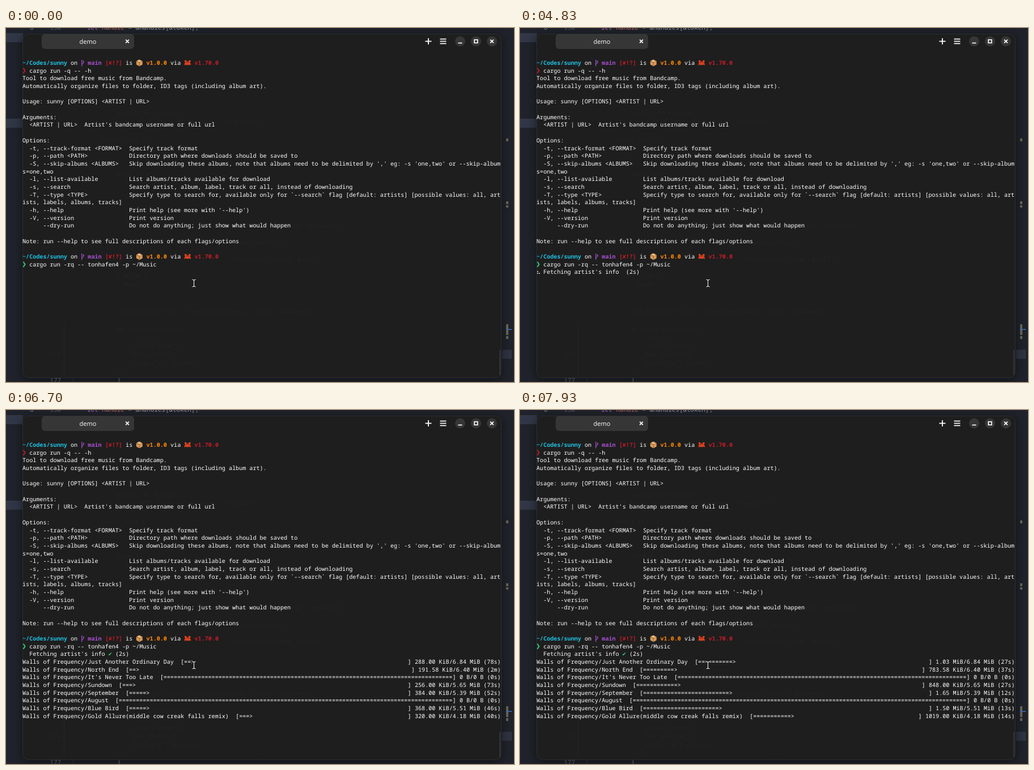
An HTML page with a canvas for the animation above (8000 ms loop, 896 by 625 pixels).

```html
<!DOCTYPE html>
<html lang="en">
<head>
<meta charset="utf-8">
<title>Terminal demo</title>
<style>
html, body { margin: 0; width: 100%; height: 100%; overflow: hidden; background: #20232b; }
canvas { display: block; width: 896px; height: 625px; }
</style>
</head>
<body>
<canvas id="stage" width="896" height="625"></canvas>
<script>
const ctx = document.getElementById('stage').getContext('2d');
const LOOP = 8000;
const COLS = 139, CELL = 6.07, ROW = 13.68, LEFT = 29, TOP = 54.6, ASCENT = 10.45;
const MONO = '10.117px "Noto Sans Mono", "DejaVu Sans Mono", monospace';
const CODE = '10.95px "Noto Sans Mono", "DejaVu Sans Mono", monospace';
const FG = '#ffffff', RED = '#c01c28', GREEN = '#33d17a', CYAN = '#1fbfe0';
const PURPLE = '#a84fd0', ORANGE = '#ff8700';

const HELP = `Tool to download free music from Bandcamp.
Automatically organize files to folder, ID3 tags (including album art).

Usage: sunny [OPTIONS] <ARTIST | URL>

Arguments:
  <ARTIST | URL>  Artist's bandcamp username or full url

Options:
  -t, --track-format <FORMAT>  Specify track format
  -p, --path <PATH>            Directory path where downloads should be saved to
  -S, --skip-albums <ALBUMS>   Skip downloading these albums, note that albums need to be delimited by ',' eg: -s 'one,two' or --skip-album
s=one,two
  -l, --list-available         List albums/tracks available for download
  -s, --search                 Search artist, album, label, track or all, instead of downloading
  -T, --type <TYPE>            Specify type to search for, available only for \`--search\` flag [default: artists] [possible values: all, art
ists, labels, albums, tracks]
  -h, --help                   Print help (see more with '--help')
  -V, --version                Print version
      --dry-run                Do not do anything; just show what would happen

Note: run --help to see full descriptions of each flags/options`.split('\n');
const COMMAND = 'cargo run -rq -- tonhafen4 -p ~/Music';

const ENTER = 3000, FETCH = 3130, DONE = 5500;
const BLINKS = [[100, 730], [1330, 1900], [2500, ENTER]];
const SPINNER = '⠁⠁⠉⠙⠚⠒⠂⠂⠒⠲⠴⠤⠄⠄⠤⠠⠠⠤⠦⠖⠒⠐⠐⠒⠓⠋⠉⠈⠈';

// Download progress: KiB done and seconds left at each key time
const KEYS = [6270, 6700, 7500, 7930];
const STEPS = [8, 15, 8];
const track = (title, mib, done, eta) => ({ title, mib, done, eta });
const TRACKS = [
  track('Just Another Ordinary Day', 6.84, [32, 288, 624, 1056], [240, 78, 37, 27]),
  track('North End', 6.40, [15.58, 191.58, 479.58, 783.58], [1800, 120, 52, 37]),
  track("It's Never Too Late", 0),
  track('Sundown', 5.65, [80, 256, 512, 848], [240, 73, 37, 27]),
  track('September', 5.39, [80, 384, 1104, 1688], [240, 52, 19, 12]),
  track('August', 0),
  track('Blue Bird', 5.51, [80, 368, 1003.37, 1536], [120, 46, 20, 13]),
  track('Gold Allure(middle cow creak falls remix)', 4.18, [64, 320, 715, 1019], [120, 40, 18, 14]),
];

function rect(x, y, w, h, color, r = 0) {
  ctx.fillStyle = color;
  ctx.beginPath();
  ctx.roundRect(x, y, w, h, r);
  ctx.fill();
}

function line(points, color, width) {
  ctx.strokeStyle = color;
  ctx.lineWidth = width;
  ctx.beginPath();
  points.forEach(([x, y], i) => i ? ctx.lineTo(x, y) : ctx.moveTo(x, y));
  ctx.stroke();
}

function disc(x, y, r, color) {
  ctx.fillStyle = color;
  ctx.beginPath();
  ctx.arc(x, y, r, 0, Math.PI * 2);
  ctx.fill();
}

function label(str, x, y, font, color, align = 'left') {
  ctx.font = font;
  ctx.fillStyle = color;
  ctx.textAlign = align;
  ctx.fillText(str, x, y);
}

const colX = col => LEFT + col * CELL;
const rowY = row => TOP + row * ROW;

function put(str, col, row, color = FG, bold = false) {
  label(str, colX(col), rowY(row) + ASCENT, (bold ? 'bold ' : '') + MONO, color);
}

function symbol(ch, col, row, color) {
  label(ch, colX(col + 0.5), rowY(row) + ASCENT, '9px "DejaVu Sans", sans-serif', color, 'center');
}

function cross(x, y, r, width) {
  line([[x - r, y - r], [x + r, y + r]], FG, width);
  line([[x - r, y + r], [x + r, y - r]], FG, width);
}

function editor() {
  rect(0, 0, 896, 625, '#20232b');
  rect(0, 9, 30, 16, '#313746');
  rect(0, 160, 30, 16, '#313746');
  rect(875, 568, 17, 16, '#2f3442');
  label('6', 42, 3, CODE, '#6f8f96');
  label('130', 77.5, 3, CODE, '#565c69');
  label('let', 143, 3, CODE, '#a765b8');
  label('handle', 169.3, 3, CODE, '#b9626b');
  label('= &handles[&token];', 215.3, 3, CODE, '#8f95a1');
  label('177', 77.5, 626, CODE, '#6a707c');
  line([[118.5, 618], [118.5, 625]], '#343945', 1);
  label('}', 196, 625, CODE, '#777d89');
  for (const [y, h] of [[195, 5], [306, 5], [313, 4], [523, 19], [544, 5]]) rect(882, y, 4, h, '#6b6755');
  rect(882, 531.5, 10, 1.5, '#4074c8');
}

function ghostCode() {
  const lines = [
    ['export fn format(', 196, 154], ['let bar = self.bars.get(&token, "template");', 168, 168],
    ['match self {', 168, 200], ['None => {', 196, 262], ['let style = ProgressStyle::default();', 358, 353],
    ['with_entry();', 410, 383], ['.format(bar, name, &self);', 390, 412],
    ['} else {', 196, 441], ['None', 208, 457],
    ['let_mut(&self.bar, timestamp(token, status, &value));', 196, 504],
    ['pb.println(format!(', 196, 535], ['"{} {}",', 222, 551], ['style("done"),', 222, 565],
    ['bar.prefix(),', 222, 580], ['style("✔").green(),', 222, 595], ['));', 196, 609], ['174', 77.5, 580],
  ];
  for (const [str, x, y] of lines) label(str, x, y, CODE, '#242425');
  line([[102.5, 520], [102.5, 612]], '#242425', 1);
}

function terminalFrame() {
  ctx.save();
  ctx.shadowColor = 'rgba(0,0,0,0.5)';
  ctx.shadowBlur = 18;
  ctx.shadowOffsetY = 3;
  rect(29, 10, 845, 608, '#1e1e1e', 11);
  ctx.restore();
  ctx.strokeStyle = '#2d2e31';
  ctx.lineWidth = 1;
  ctx.beginPath();
  ctx.roundRect(29.5, 10.5, 844, 607, 11);
  ctx.stroke();
  ghostCode();

  rect(63, 10.5, 163, 26.5, '#363636', 6);
  label('demo', 144.5, 27.8, '11px "Open Sans", "Noto Sans", sans-serif', FG, 'center');
  cross(214, 23.5, 2.8, 1.8);

  line([[739.5, 23.5], [750.5, 23.5]], FG, 1.8);
  line([[745, 18], [745, 29]], FG, 1.8);
  for (const y of [19.5, 23.5, 27.5]) line([[765.5, y], [776.5, y]], FG, 1.7);
  for (const x of [801, 829, 857]) disc(x, 23.5, 9, '#363636');
  line([[797.5, 26.5], [804.5, 26.5]], FG, 1.7);
  ctx.lineWidth = 1.7;
  ctx.strokeRect(826.2, 20.7, 5.6, 5.6);
  cross(857, 23.5, 2.9, 1.8);

  rect(870.5, 568, 1.5, 45, '#3c3c3c', 0.7);
}

function branchIcon(x, y) {
  line([[x + 1.5, y + 1.5], [x + 1.5, y + 13]], PURPLE, 1.2);
  ctx.beginPath();
  ctx.moveTo(x + 1.5, y + 9.5);
  ctx.quadraticCurveTo(x + 5.2, y + 7.5, x + 5, y + 4);
  ctx.lineTo(x + 3, y + 4.2);
  ctx.stroke();
}

function packageIcon(x, y) {
  ctx.fillStyle = '#d99a5b';
  ctx.beginPath();
  ctx.moveTo(x + 6, y);
  ctx.lineTo(x + 11.5, y + 2.8);
  ctx.lineTo(x + 11.5, y + 9);
  ctx.lineTo(x + 6, y + 12);
  ctx.lineTo(x + 0.5, y + 9);
  ctx.lineTo(x + 0.5, y + 2.8);
  ctx.fill();
  line([[x + 0.5, y + 3], [x + 6, y + 5.6], [x + 11.5, y + 3]], '#8f5a2b', 0.9);
  line([[x + 6, y + 5.6], [x + 6, y + 12]], '#8f5a2b', 0.9);
  line([[x + 3, y + 1.5], [x + 8.8, y + 4.3]], '#f0d09c', 1.5);
}

function crabIcon(x, y) {
  const color = '#d9401f';
  for (const side of [-1, 1]) {
    const at = (dx, dy) => [x + 6 + side * dx, y + dy];
    disc(...at(3.6, 3.2), 1.9, color);
    for (const dy of [6.8, 8.6]) line([at(3, dy), at(5.7, dy + 1.4)], color, 1.2);
  }
  ctx.fillStyle = color;
  ctx.beginPath();
  ctx.ellipse(x + 6, y + 6.9, 4.8, 3.3, 0, 0, Math.PI * 2);
  ctx.fill();
  disc(x + 4.7, y + 5.2, 0.7, '#2a1512');
  disc(x + 7.3, y + 5.2, 0.7, '#2a1512');
}

function prompt(row, command, arrow) {
  const y = rowY(row);
  put('~/Codes/sunny', 0, row, CYAN, true);
  put('on', 14, row);
  branchIcon(colX(17), y);
  put('main', 19, row, PURPLE, true);
  put('[', 24, row, RED, true);
  symbol('✘', 25, row, RED);
  put('!?]', 26, row, RED, true);
  put('is', 30, row);
  packageIcon(colX(33), y + 1);
  put('v1.0.0', 36, row, ORANGE, true);
  put('via', 43, row);
  crabIcon(colX(47), y + 0.8);
  put('v1.70.0', 50, row, RED, true);

  const ay = rowY(row + 1);
  line([[30.5, ay + 2.4], [33.7, ay + 7], [30.5, ay + 11.6]], arrow, 1.8);
  put(command, 2, row + 1);
}

function block(col, row) {
  rect(colX(col), rowY(row), CELL, ROW, FG);
}

function spinner(t, row) {
  const i = Math.floor((t - 3030) / 100);
  const bits = SPINNER.charCodeAt(i) - 0x2800;
  for (let d = 0; d < 6; d++) {
    if (bits >> d & 1) disc(d < 3 ? 31.2 : 34.2, rowY(row) + 2.8 + (d % 3) * 3.2, 0.9, FG);
  }
}

function fetchLine(t) {
  put("Fetching artist's info", 2, 27);
  if (t < DONE) {
    spinner(t, 27);
    put(`(${t < 3600 ? 0 : t < 4600 ? 1 : 2}s)`, 26, 27);
  } else {
    symbol('✔', 25, 27, GREEN);
    put('(2s)', 27, 27);
  }
}

const formatSize = kib =>
  !kib ? '0 B' : kib < 1024 ? kib.toFixed(2) + ' KiB' : (kib / 1024).toFixed(2) + ' MiB';
const formatEta = s => s < 90 ? Math.round(s) + 's' : Math.round(s / 60) + 'm';

function progress(tr, t) {
  if (!tr.mib || t < KEYS[0]) return { done: 0, total: 0, eta: 0 };
  const total = tr.mib * 1024;
  let i = 0;
  while (i < 3 && t >= KEYS[i + 1]) i++;
  if (i === 3) return { done: tr.done[3], total, eta: tr.eta[3] };
  const n = STEPS[i];
  const p = Math.floor((t - KEYS[i]) / (KEYS[i + 1] - KEYS[i]) * n) / n;
  // Data arrives in 16 KiB chunks
  const gain = Math.floor((tr.done[i + 1] - tr.done[i]) * p / 16) * 16;
  const eta = tr.eta[i] * (tr.eta[i + 1] / tr.eta[i]) ** p;
  return { done: tr.done[i] + gain, total, eta };
}

function bar(tr, row, t) {
  const { done, total, eta } = progress(tr, t);
  const head = `Walls of Frequency/${tr.title}  [`;
  const tail = `] ${formatSize(done)}/${formatSize(total)} (${formatEta(eta)})`;
  const width = COLS - head.length - tail.length;
  const fill = total ? Math.floor(width * done / total) : width;
  put(head + ('='.repeat(fill) + '>').slice(0, width), 0, row);
  put(tail, COLS - tail.length, row);
}

function pointer() {
  const shape = [[[328.5, 444], [331.5, 445], [334.5, 444]], [[331.5, 445], [331.5, 456]],
    [[328.5, 457], [331.5, 456], [334.5, 457]]];
  for (const part of shape) line(part, '#111111', 3);
  for (const part of shape) line(part, '#f0f0f0', 1.2);
}

function draw(t) {
  ctx.textBaseline = 'alphabetic';
  ctx.textRendering = 'geometricPrecision';
  editor();
  terminalFrame();
  prompt(0, 'cargo run -q -- -h', RED);
  HELP.forEach((str, i) => put(str, 0, i + 2));
  prompt(25, COMMAND, GREEN);

  if (BLINKS.some(([from, to]) => t >= from && t < to)) block(COMMAND.length + 2, 26);
  if (t >= ENTER && t < FETCH) block(0, 27);
  if (t >= FETCH) fetchLine(t);
  if (t >= DONE) TRACKS.forEach((tr, i) => bar(tr, 28 + i, t));
  pointer();
}

const start = performance.now();
function tick() {
  draw((performance.now() - start) % LOOP);
  requestAnimationFrame(tick);
}
tick();
</script>
</body>
</html>
```
